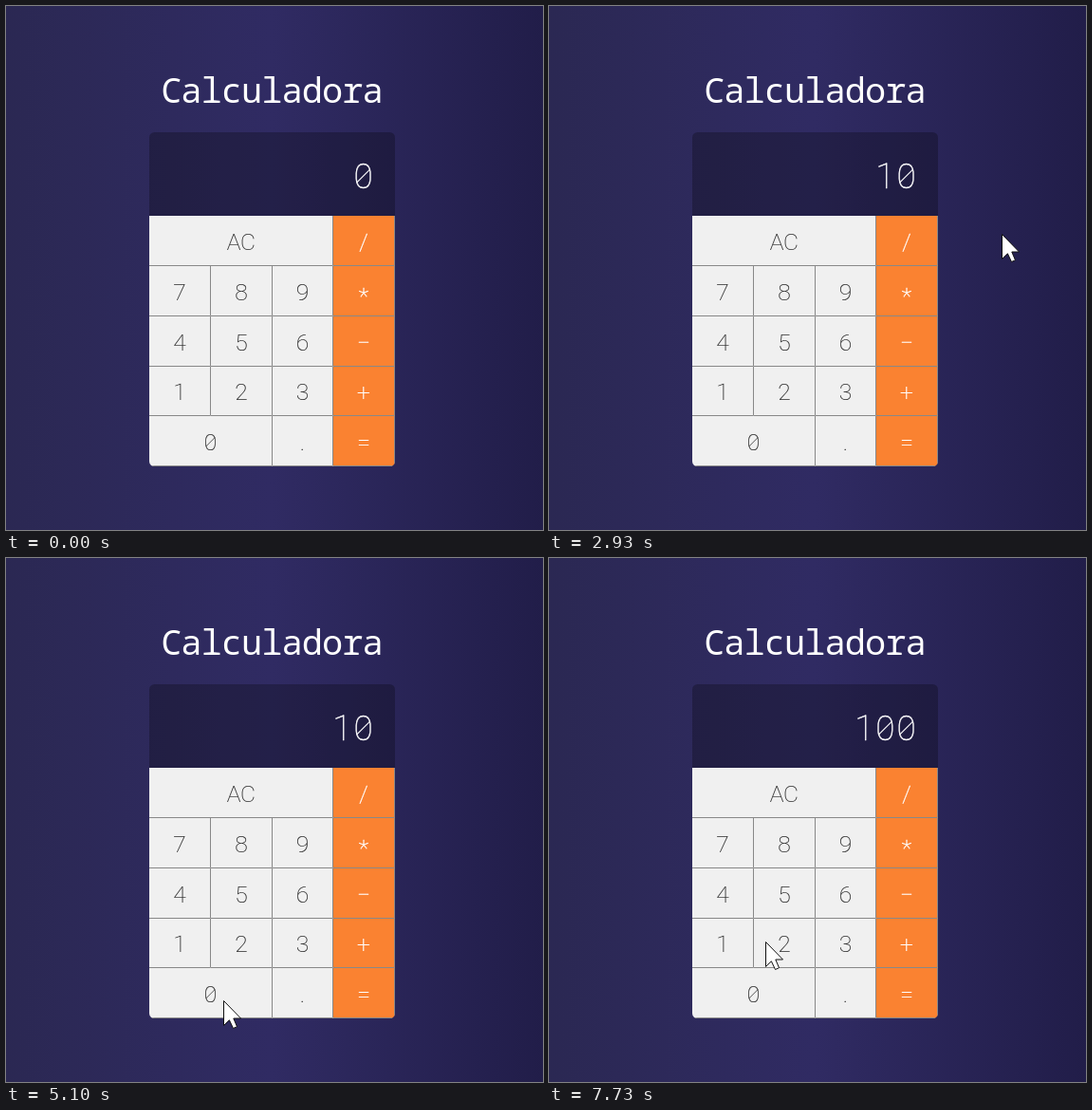
Recreate the animation shown at these times as an HTML page. Size 566x552 px, loop 8000 ms.

```html
<!DOCTYPE html>
<html lang="pt">
<head>
<meta charset="utf-8">
<title>Calculadora</title>
<style>
  html, body { margin: 0; width: 100%; height: 100%; overflow: hidden; background: #2c2859; }
  svg { display: block; width: 566px; height: 552px; }
  text { font-family: Roboto, sans-serif; font-weight: 100; text-anchor: middle; }
  .title { font: 400 37px "Noto Sans Mono", "DejaVu Sans Mono", monospace; letter-spacing: -.95px; fill: #fff; }
  .key { fill: #222; stroke: #222; stroke-width: .12; }
  .op { fill: #fff; stroke: #fff; stroke-width: .4; }
  .key rect { fill: #f0f0f0; stroke: none; }
  .op rect { fill: #fa8231; }
  .key.down rect { fill: #ccc; }
  .op.down rect { fill: #d2713b; }
  .key .edge { fill: none; stroke: #888; stroke-width: 1; }
  .slash { stroke-width: .03em; }
  #digits { fill: #fff; stroke: #fff; stroke-width: .4; }
</style>
</head>
<body>
<svg viewBox="0 0 566 552">
  <defs>
    <linearGradient id="sky" gradientUnits="userSpaceOnUse" x1="-360" x2="920">
      <stop offset="0" stop-color="#24243e"/>
      <stop offset=".5" stop-color="#302b63"/>
      <stop offset="1" stop-color="#0f0c29"/>
    </linearGradient>
    <clipPath id="body"><rect x="151" y="133" width="259" height="352" rx="5.5"/></clipPath>
  </defs>
  <rect width="566" height="552" fill="url(#sky)"/>
  <text class="title" x="280" y="101.5">Calculadora</text>
  <g clip-path="url(#body)">
    <rect x="151" y="133" width="259" height="88" fill="#000" fill-opacity=".267"/>
    <g id="keys"></g>
  </g>
  <g id="digits"></g>
  <circle id="halo" r="12" fill="#e8e83a" fill-opacity=".78"/>
  <path id="cursor" d="M.5 .5V26.5L6.4 20.8L10.5 29.5L14.5 27.7L10.8 19H18.5Z"
        fill="#fff" stroke="#111" stroke-linejoin="round"/>
</svg>
<script>
const LOOP = 8000, STEP = 77;
const KEY_SIZE = 24.64, READOUT_SIZE = 36.96;
const $ = id => document.getElementById(id);

function add(parent, name, attrs, text) {
  const el = document.createElementNS('http://www.w3.org/2000/svg', name);
  for (const k in attrs) el.setAttribute(k, attrs[k]);
  if (text) el.textContent = text;
  return parent.appendChild(el);
}

// One character centred on x; zeros get a slash.
function glyph(parent, ch, x, y, size) {
  const lower = ch === '*' ? size * .15 : 0;
  add(parent, 'text', { x, y: y + lower, 'font-size': size }, ch === '-' ? '\u2212' : ch);
  if (ch === '0') {
    const d = size * .19, cy = y - size * .355;
    add(parent, 'path', { class: 'slash', 'font-size': size, d: `M${x - d} ${cy + d}L${x + d} ${cy - d}` });
  }
}

// Keypad: a repeated label spans several columns.
const colX = c => Math.round(151.2 + c * 64.7);
const rowY = r => Math.round(221.2 + r * 52.8);
const keys = {};
['AAA/', '789*', '456-', '123+', '00.='].forEach((row, r) => {
  for (const id of new Set(row)) {
    const first = row.indexOf(id), end = row.lastIndexOf(id) + 1;
    const x = colX(first), x2 = colX(end), y = rowY(r), y2 = rowY(r + 1);
    const g = keys[id] = add($('keys'), 'g', { class: first === 3 ? 'key op' : 'key' });
    add(g, 'rect', { x, y, width: x2 - x, height: y2 - y });
    add(g, 'path', { class: 'edge', d: `M${x} ${y2 - .5}H${x2 - .5}V${y}` });
    const label = id === 'A' ? 'AC' : id;
    [...label].forEach((ch, i) => {
      const shift = (i - (label.length - 1) / 2) * KEY_SIZE * .6;
      glyph(g, ch, (x + x2 - 1) / 2 + shift, Math.round(257 + r * 52.8), KEY_SIZE);
    });
  }
});

// Cursor moves: start, end, target x, y and, for curved moves, a control point
const home = [322, 467];
const moves = [
  [450, 1220, 206, 372, 60, 265],
  [1300, 1530, 198, 408],
  [1920, 2160, 215, 456],
  [2480, 3240, 402, 319, 620, 109],
  [3560, 4330, 182, 413, 120, 380],
  [4710, 4870, 229, 466],
  [5100, 5400, 384, 465],
  [6093, 6480, 410, 270, 371, 430],
  [6650, 6950, 386, 254],
  [7280, 7730, 228, 404]
];

// Presses: key, down, up
const presses = [['1', 1700, 1920], ['0', 2310, 2480], ['*', 3410, 3560], ['1', 4560, 4710],
                 ['0', 5020, 5100], ['=', 5710, 5870], ['/', 7120, 7280]];

function cursorAt(t) {
  const i = moves.findLastIndex(m => t >= m[0]);
  if (i < 0) return null;
  const from = i ? moves[i - 1].slice(2, 4) : home;
  const [start, end, x, y, cx = (from[0] + x) / 2, cy = (from[1] + y) / 2] = moves[i];
  const steps = Math.round((end - start) / STEP);
  const u = Math.min(1, Math.floor((t - start) / STEP + .25) / steps), v = 1 - u;
  const curve = (a, b, c) => Math.round(v * v * a + 2 * u * v * b + u * u * c);
  return [curve(from[0], cx, x), curve(from[1], cy, y)];
}

// Replays the finished presses on a simple calculator.
function readoutAt(t) {
  let value = '0', held = 0, op = '', fresh = true;
  const apply = { '+': (a, b) => a + b, '-': (a, b) => a - b, '*': (a, b) => a * b, '/': (a, b) => a / b };
  for (const [key, , up] of presses) {
    if (up > t) break;
    if (/\d/.test(key)) {
      value = fresh ? key : value + key;
      fresh = false;
    } else {
      if (op) value = String(apply[op](held, +value));
      held = +value;
      op = key === '=' ? '' : key;
      fresh = true;
    }
  }
  return value;
}

let shown;
function showNumber(value) {
  if (value === shown) return;
  shown = value;
  $('digits').replaceChildren();
  [...value].reverse().forEach((ch, i) =>
    glyph($('digits'), ch, 376.6 - i * READOUT_SIZE * .6, 192.3, READOUT_SIZE));
}

function draw(t) {
  const pos = cursorAt(t);
  const press = presses.find(p => t >= p[1] && t < p[2]);
  for (const k in keys) keys[k].classList.toggle('down', !!press && press[0] === k);
  showNumber(readoutAt(t));
  $('halo').style.display = press ? '' : 'none';
  $('cursor').style.display = pos ? '' : 'none';
  if (!pos) return;
  for (const id of ['halo', 'cursor']) $(id).setAttribute('transform', `translate(${pos})`);
}

const begin = performance.now();
function tick() {
  draw((performance.now() - begin) % LOOP);
  requestAnimationFrame(tick);
}
tick();
</script>
</body>
</html>
```
